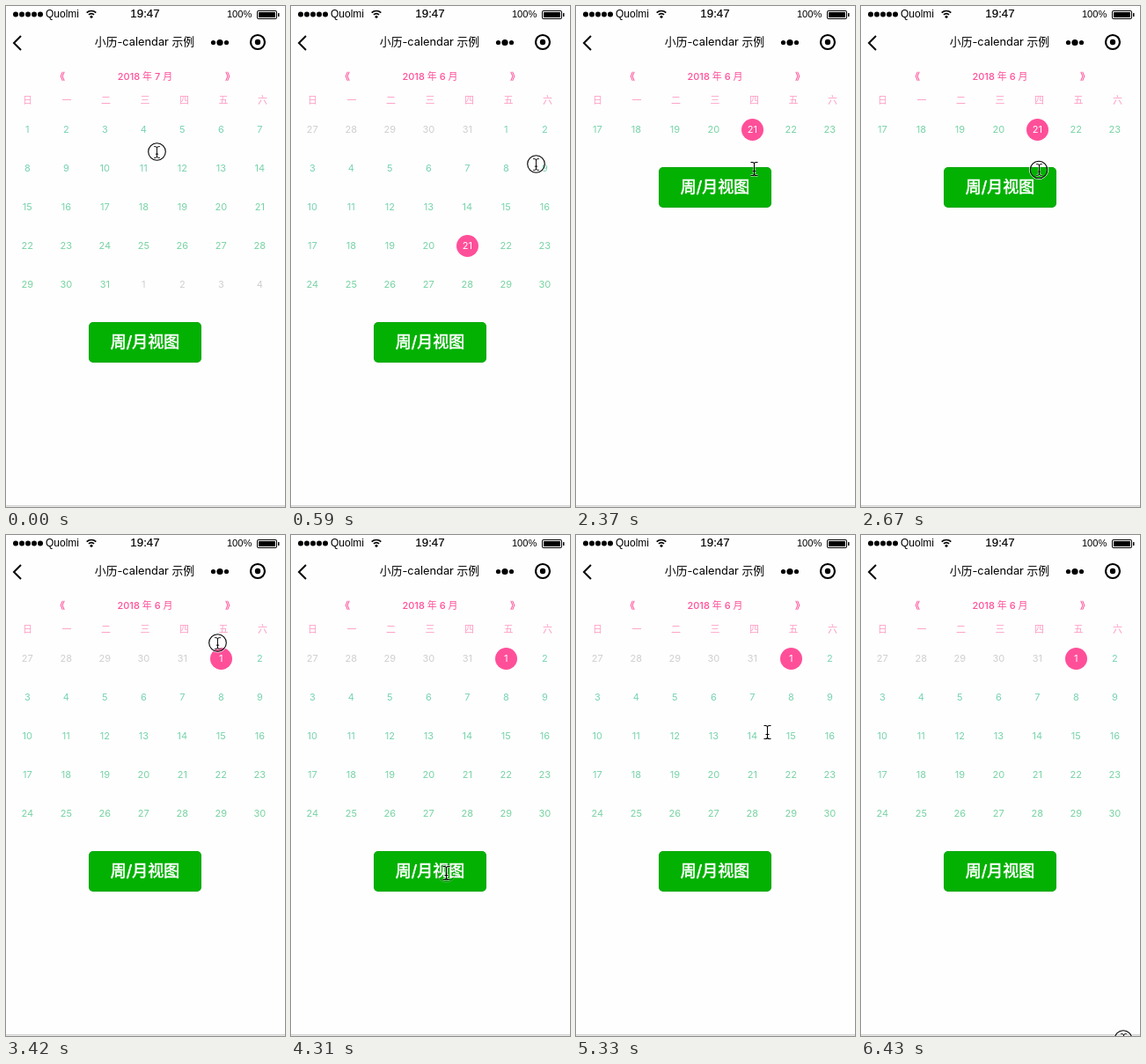
These frames come from a looping animation (317x569 px, 6530 ms). An HTML page with a canvas:

```html
<!DOCTYPE html>
<html lang="zh-CN">
<head>
<meta charset="utf-8">
<title>Calendar</title>
<style>
html, body { margin: 0; width: 100%; height: 100%; overflow: hidden; background: #fefefe; }
canvas { display: block; }
</style>
</head>
<body>
<canvas id="stage" width="317" height="569"></canvas>
<script>
const ctx = document.getElementById('stage').getContext('2d');
const LOOP = 6530;
const UI = 'Inter, "Noto Sans CJK SC", "Noto Sans CJK", sans-serif';
const STATUS = '"Liberation Sans", Arial, sans-serif';
const PINK = '#ff4f99';

const july = { month: 7, first: 0, before: 30, days: 31 };
const june = { month: 6, first: 5, before: 31, days: 30, picked: 21 };
const june1 = { ...june, picked: 1 };

// start time, month, week view, pointer x, y, ring opacity, button pressed
const cues = [
  [0, july, 0, 171.5, 165.5, 1],
  [150, july, 0, 141.5, 186, 0],
  [440, june, 0, 214, 183, 0],
  [590, june, 0, 278.5, 179.5, 1],
  [880, june, 0, 272, 197, 0],
  [1030, june, 0, 241, 245, 0],
  [1180, june, 0, 205, 306, 0],
  [1330, june, 0, 182, 347, 0],
  [1630, june, 0, 180.5, 372, 0],
  [1930, june, 0, 180.5, 372, 1],
  [2080, june, 1, 181, 370, 0, 1],
  [2230, june, 1, 194, 270, 0],
  [2370, june, 1, 202, 185, 0],
  [2670, june, 1, 202, 186, 1],
  [2820, june, 0, 202, 186, 0],
  [2970, june, 0, 226, 146, 0],
  [3120, june, 0, 240, 124, 0],
  [3420, june1, 0, 240.5, 122.5, 1],
  [3570, june1, 0, 240, 125, 0],
  [3720, june1, 0, 232, 172, 0],
  [3860, june1, 0, 212, 260, 0],
  [4010, june1, 0, 187, 352, 0],
  [4160, june1, 0, 176.5, 384, 1],
  [4310, june1, 0, 176.5, 384, 0.2],
  [4450, june1, 1, 176.5, 384, 0, 1],
  [4600, june1, 1, 186, 348, 0],
  [4740, june1, 1, 208, 266, 0],
  [4890, june1, 1, 217.5, 224, 0],
  [5190, june1, 1, 217.5, 224, 1],
  [5330, june1, 0, 217.5, 224, 0],
  [5630, june1, 0, 232, 300, 0],
  [5780, june1, 0, 262, 440, 0],
  [5930, june1, 0, 281, 547, 0],
  [6070, june1, 0, 296, 590, 0],
  [6430, june1, 0, 298, 572.5, 1]
];

function text(str, x, y, size, color, { family = UI, weight = 400, align = 'center', bolder = 0 } = {}) {
  ctx.font = `${weight} ${size}px ${family}`;
  ctx.textAlign = align;
  ctx.fillStyle = ctx.strokeStyle = color;
  ctx.fillText(str, x, y + size * 0.36);
  if (bolder) {
    ctx.lineWidth = bolder;
    ctx.strokeText(str, x, y + size * 0.36);
  }
}

function disc(x, y, r, color) {
  ctx.fillStyle = color;
  ctx.beginPath();
  ctx.arc(x, y, r, 0, 7);
  ctx.fill();
}

function arc(x, y, r, width, color, from = 0, to = Math.PI * 2) {
  ctx.lineWidth = width;
  ctx.strokeStyle = color;
  ctx.beginPath();
  ctx.arc(x, y, r, from, to);
  ctx.stroke();
}

function box(x, y, w, h, r, color) {
  ctx.fillStyle = color;
  ctx.beginPath();
  ctx.roundRect(x, y, w, h, r);
  ctx.fill();
}

function drawBars() {
  for (let i = 0; i < 5; i++) disc(11 + i * 7, 9.5, 3, '#000');
  text('Quolmi', 45, 9, 12, '#000', { family: STATUS, align: 'left' });
  disc(97, 12.3, 1.5, '#000');
  for (const r of [4.3, 7.5]) arc(97, 13, r, 1.7, '#000', -Math.PI * 0.75, -Math.PI * 0.25);
  text('19:47', 158, 8.3, 13.3, '#000', { family: STATUS, bolder: 0.2 });
  text('100%', 279.5, 9, 11.2, '#000', { family: STATUS, align: 'right' });
  box(285, 5, 23, 10, 2, '#000');
  box(286, 6, 21, 8, 1, '#fff');
  box(287, 7, 19, 6, 0.5, '#000');
  box(309, 8, 1.5, 4, 0.5, '#000');

  ctx.lineWidth = 2;
  ctx.strokeStyle = '#000';
  ctx.stroke(new Path2D('M17 34 L9 42 L17 50'));
  text('小历-calendar 示例', 157.5, 40.3, 12.8, '#000');
  disc(235.5, 41.5, 2.6, '#000');
  disc(243, 41.5, 3.6, '#000');
  disc(250.5, 41.5, 2.6, '#000');
  arc(286, 41, 8, 2.2, '#000');
  disc(286, 41, 3.2, '#000');

  box(0, 567, 317, 1.5, 0, '#d2d2d2');
}

function drawCalendar(m, week) {
  text('《', 56, 80, 11, PINK, { weight: 700, align: 'left' });
  text('》', 249, 80, 11, PINK, { weight: 700, align: 'left' });
  text(`2018 年 ${m.month} 月`, 158, 80, 11, PINK, { weight: 500 });
  [...'日一二三四五六'].forEach((name, i) => text(name, 24.5 + i * 44.5, 107, 11, '#ff9dc4'));

  const start = week ? Math.floor((m.first + m.picked - 1) / 7) * 7 : 0;
  for (let i = 0; i < (week ? 7 : 35); i++) {
    const day = start + i - m.first + 1;
    const x = 24.3 + i % 7 * 44, y = 140 + Math.floor(i / 7) * 44;
    const outside = day < 1 || day > m.days;
    const label = day < 1 ? day + m.before : day > m.days ? day - m.days : day;
    const picked = day === m.picked;
    if (picked) disc(x + 0.2, y + 0.5, 12.5, PINK);
    const color = picked ? '#fff' : outside ? '#cfcfcf' : `hsl(${161 - day * 0.5} 51% 65%)`;
    text(label, x, y, 11, color);
  }
}

function drawButton(week, pressed) {
  const y = week ? 183 : 359;
  box(94, y, 128, 46, 5, '#0a9c0a');
  box(94.5, y + 0.5, 127, 45, 4.5, pressed ? '#049c04' : '#02b102');
  text('周/月视图', 158, y + 23, 18, pressed ? '#c8e8c8' : '#fff', { bolder: 0.6 });
}

function drawPointer(x, y, ring) {
  if (ring) {
    ctx.globalAlpha = ring;
    arc(x, y, 10.6, 1, '#fff');
    arc(x, y, 9.8, 1.1, '#000');
    ctx.globalAlpha = 1;
  }
  ctx.save();
  ctx.translate(Math.floor(x) + 0.5, Math.round(y));
  if (ring === 1) ctx.scale(0.85, 0.85);
  const beam = new Path2D('M-4 -7.5 H-2 Q0 -7.5 0 -5.5 Q0 -7.5 2 -7.5 H4 M0 -6 V6 M-4 7.5 H-2 Q0 7.5 0 5.5 Q0 7.5 2 7.5 H4 M-2 2.5 H2');
  for (const [width, color] of [[2.4, 'rgba(255,255,255,.7)'], [1.1, '#000']]) {
    ctx.lineWidth = width;
    ctx.strokeStyle = color;
    ctx.stroke(beam);
  }
  ctx.restore();
}

function frame(now) {
  const t = now % LOOP;
  const [, month, week, x, y, ring, pressed] = cues.findLast(cue => cue[0] <= t);
  box(0, 0, 317, 569, 0, '#fefefe');
  drawBars();
  drawCalendar(month, week);
  drawButton(week, pressed);
  drawPointer(x, y, ring);
  requestAnimationFrame(frame);
}
frame(0);
</script>
</body>
</html>
```
